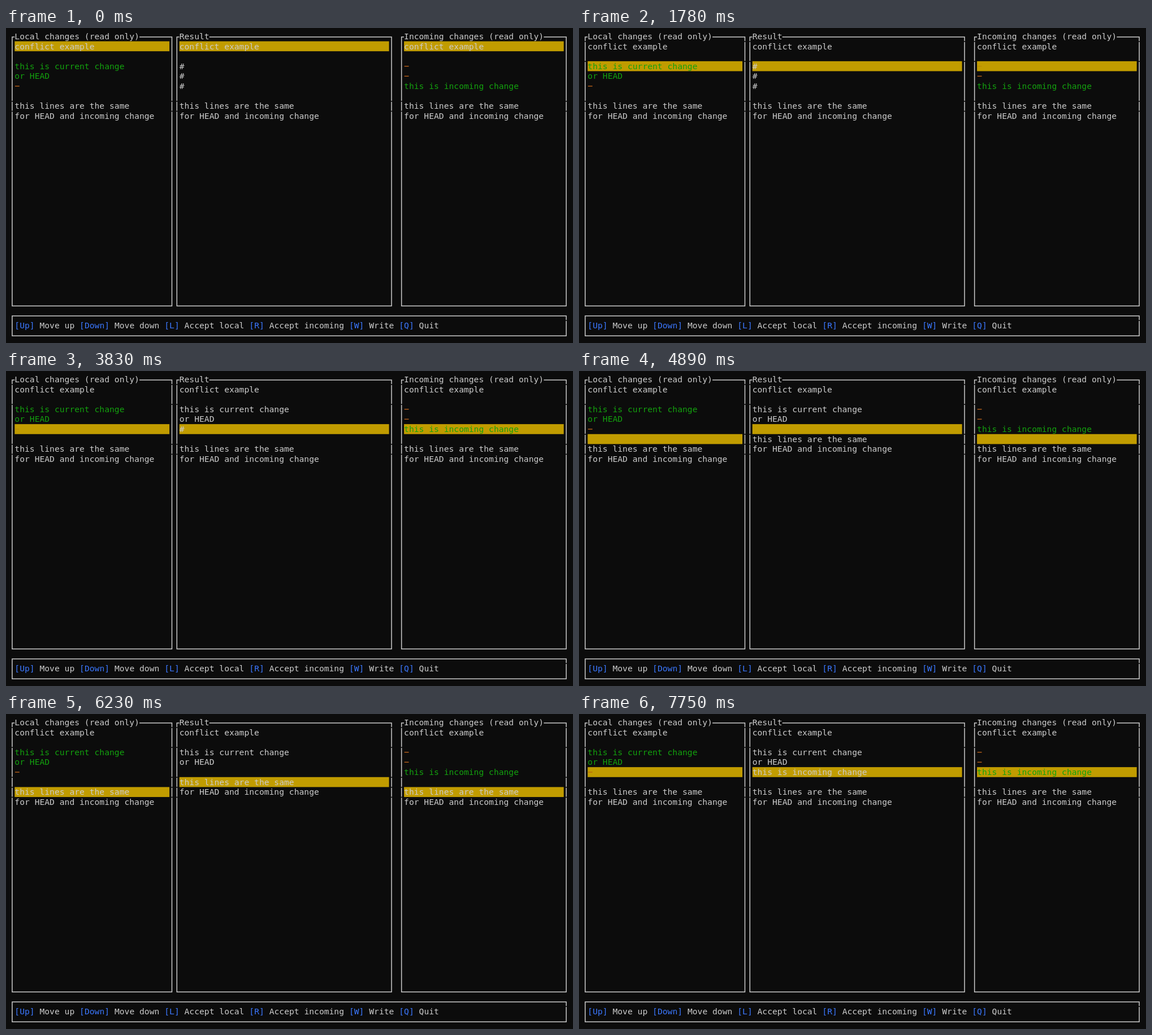
Write an HTML page with a canvas that moves like this. It is 1003x558 px and loops after 8 s.

```html
<!DOCTYPE html>
<html lang="en">
<head>
<meta charset="utf-8">
<title>Merge conflict tool</title>
<style>
html, body { margin: 0; width: 1003px; height: 558px; overflow: hidden; background: #0c0c0c; }
canvas { display: block; }
</style>
</head>
<body>
<canvas id="screen" width="1003" height="558"></canvas>
<script>
const ctx = document.getElementById('screen').getContext('2d');
const LOOP = 8000;
const CELL = 8.83, ROW = 17.647;
const X = col => 6.5 + col * CELL;
const Y = row => (row + 1 / 3) * ROW;
const BG = '#0c0c0c', WHITE = '#cccccc', GREEN = '#13a10e', BLUE = '#3b78ff',
      GOLD = '#c19c00', DASH = '#b8601a';

const SAME = ['', 'this lines are the same', 'for HEAD and incoming change'];
const LOCAL = ['this is current change', 'or HEAD', '-'];
const INCOMING = ['-', '-', 'this is incoming change'];

// Each step: start time, cursor row, lines merged so far, last merged line.
const STEPS = [
  [0, 1, 0], [720, 2, 0], [1780, 3, 0], [2640, 3, 1], [3040, 4, 1],
  [3500, 4, 2], [3830, 5, 2], [4360, 5, 3, 'cut'], [4890, 6, 3, 'cut'],
  [5240, 7, 3, 'cut'], [5830, 8, 3, 'cut'], [6230, 7, 3, 'cut'],
  [6430, 6, 3, 'cut'], [6760, 5, 3, 'cut'], [7750, 5, 3, 'incoming']
];

function rect(x, y, w, h, color) {
  ctx.fillStyle = color;
  ctx.fillRect(x, y, w, h);
}

function text(str, col, row, color = WHITE) {
  ctx.fillStyle = color;
  ctx.fillText(str, X(col), Y(row) + 14);
}

function frame(left, right, top, bottom, title, seams) {
  const x0 = X(left + 0.5), x1 = X(right + 0.5);
  const y0 = Y(top + 0.5) + 1.2, y1 = Y(bottom + 0.5) + 1.2;
  ctx.strokeStyle = WHITE;
  ctx.lineWidth = 1.5;
  ctx.strokeRect(x0, y0, x1 - x0, y1 - y0);
  if (title) {
    rect(X(left + 1), Y(top), title.length * CELL, ROW - 1, BG);
    text(title, left + 1, top);
  }
  for (const row of seams)
    for (const x of [x0, x1]) rect(x - 2, Y(row) - 0.4, 4, 1.6, BG);
}

function lines(list, col, width, cursor, late) {
  list.forEach((str, i) => {
    const row = i + 1, lit = row === cursor;
    if (lit) rect(X(col), Y(row), width * CELL, ROW, GOLD);
    if (str === '-') {
      const color = !lit ? DASH : late ? '#b5680c' : '#b98c04';
      rect(X(col) + 0.6, Y(row) + 8.2, CELL - 1, 1.4, color);
    } else {
      const changed = col !== 34 && row > 2 && row < 6;
      text(str, col, row, changed ? GREEN : WHITE);
    }
  });
}

function footer() {
  frame(0, 111, 28, 30, '', []);
  rect(X(111.5) - 2, Y(29) - 0.4, 4, 1.6, BG);
  const keys = '[Up] Move up [Down] Move down [L] Accept local [R] Accept incoming [W] Write [Q] Quit';
  for (const m of keys.matchAll(/\[\w+\]|[^\[]+/g))
    text(m[0], 1 + m.index, 29, m[0][0] === '[' ? BLUE : WHITE);
}

function draw(t) {
  const [, cursor, merged, last] = STEPS.findLast(s => s[0] <= t);
  const cut = last === 'cut';
  const head = ['conflict example', ''];
  const result = ['#', '#', '#'].map((mark, i) => i < merged ? LOCAL[i] : mark);
  if (cut) result.pop();
  else if (last) result[2] = INCOMING[2];

  const seams = [7, 8];
  if (t >= 720) seams.push(1, 3);
  if (cut) seams.push(6);
  let resultCursor = cursor;
  if (cut) resultCursor = cursor === 5 ? 0 : cursor - 1;

  rect(0, 0, 1003, 558, BG);
  ctx.font = '14.667px "DejaVu Sans Mono", monospace';
  frame(0, 32, 0, 27, 'Local changes (read only)', seams);
  frame(33, 76, 0, 27, 'Result', seams);
  frame(78, 111, 0, 27, 'Incoming changes (read only)', seams);
  lines([...head, ...LOCAL, ...SAME], 1, 31, cursor, merged > 2);
  lines([...head, ...result, ...SAME], 34, 42, resultCursor);
  lines([...head, ...INCOMING, ...SAME], 79, 32, cursor, merged > 2);
  footer();
}

const start = performance.now();
function tick() {
  draw((performance.now() - start) % LOOP);
  requestAnimationFrame(tick);
}
tick();
</script>
</body>
</html>
```
